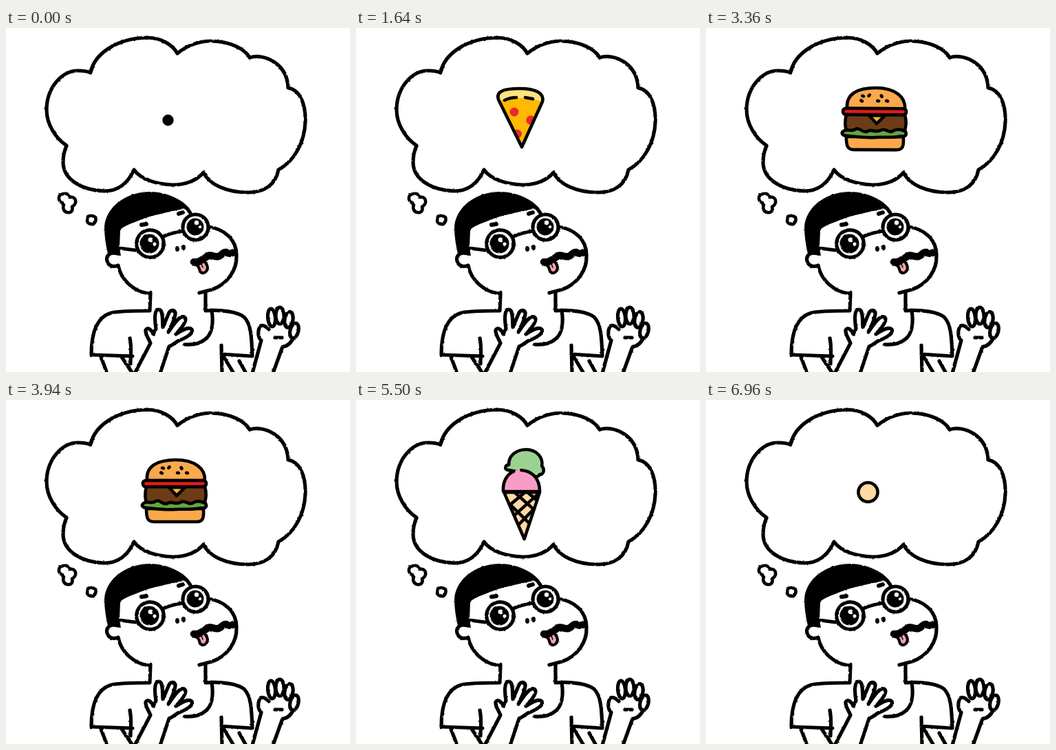
These frames come from a looping animation (500 by 500 pixels, 7 s). An HTML page:

```html
<!DOCTYPE html>
<html lang="en">
<head>
<meta charset="utf-8">
<title>Daydreaming of food</title>
<style>
  html, body { margin: 0; width: 100%; height: 100%; overflow: hidden; background: #fff; }
  svg { display: block; width: 100%; height: 100%; }
  .ink { fill: none; stroke: #000; stroke-width: 5.2; stroke-linecap: round; stroke-linejoin: round; }
  .ink .paper { fill: #fff; }
  .ink .solid { fill: #000; stroke: none; }
  .food { stroke-width: 4.6; }
  .food * { vector-effect: non-scaling-stroke; }
  .flat { stroke: none; }
</style>
</head>
<body>
<svg viewBox="0 0 500 500">
  <defs>
    <clipPath id="slice"><path d="M207 104C203 92 215 88 238 88C262 88 274 95 271 107L241 173Z"/></clipPath>
    <clipPath id="wafer"><path d="M215 134H267L245 202Z"/></clipPath>
    <filter id="marker" filterUnits="userSpaceOnUse" x="0" y="0" width="500" height="500" color-interpolation-filters="sRGB">
      <feTurbulence type="fractalNoise" baseFrequency=".2" numOctaves="2" seed="4"/>
      <feDisplacementMap in="SourceGraphic" scale="2.2" xChannelSelector="R" yChannelSelector="G"/>
    </filter>
  </defs>

  <g filter="url(#marker)">
    <!-- thought bubble -->
    <g class="ink">
      <path d="M123 65C128 38 160 15 205 14C225 14 242 24 249 37C262 26 280 19 297 19C325 19 347 30 354 43C375 36 409 52 410 87C428 90 436 112 435 137C434 165 420 193 396 206C392 228 375 239 352 239C320 239 295 227 287 210C278 221 262 228 242 228C218 227 196 220 186 206C178 224 165 237 143 237C110 236 83 220 83 195C83 186 85 178 88 171C72 160 59 140 59 119C59 88 80 62 105 62C112 62 118 63 123 65Z"/>
      <path stroke-width="4.6" d="M82 254C75 252 75 242 83 241C88 240 92 242 93 246C98 245 102 248 101 254C100 258 97 259 96 260C98 266 94 269 89 268C84 267 82 262 84 257C82 256 82 255 82 254Z"/>
      <path stroke-width="4.6" d="M119 274Q125 271 130 275Q132 281 127 285Q120 286 118 281Z"/>
    </g>

    <!-- body -->
    <g class="ink">
      <path d="M210 385L209 411C185 411 165 411 153 414C135 419 124 437 124 475L184 477M180 451C183 464 181 476 181 488M138 478L147 502M168 478L184 502"/>
      <path d="M290 384V409M290 411C315 409 337 413 346 420C356 430 357 448 358 477L313 474M313 461L314 502M316 477L331 502M339 484L349 502"/>
      <path d="M299 410C302 430 300 444 290 452C282 459 272 461 260 460"/>
      <path class="paper" d="M187 502L210 458C207 451 202 444 203 439C206 434 211 438 214 445L218 437C216 425 215 409 222 409C229 410 227 424 228 435L236 416C239 408 247 409 246 416C245 425 240 433 236 442C243 432 252 417 259 420C265 424 256 435 247 445C255 440 265 433 270 438C273 444 262 450 252 454C247 456 244 460 237 463L224 502"/>
      <path d="M358 502L371 454C365 449 366 438 370 433C374 431 378 434 382 438M418 450C413 460 408 463 402 463L388 502M391 450H401"/>
      <g class="paper">
        <ellipse rx="6" ry="11" transform="translate(419 440) rotate(14)"/>
        <ellipse rx="6" ry="11.500" transform="translate(411 424) rotate(10)"/>
        <ellipse rx="6" ry="12" transform="translate(398 418)"/>
        <ellipse rx="5.500" ry="13" transform="translate(386 421) rotate(-5)"/>
      </g>
    </g>

    <!-- head -->
    <g class="ink">
      <path class="paper" d="M163 328C150 324 145 332 147 339C149 346 157 348 163 345C167 366 186 384 209 386"/>
      <path class="solid" d="M148 328C145 316 143 302 143 290C144 262 172 239 208 238C236 238 260 251 269 266L258 263C238 267 212 272 195 279C180 285 168 289 166 294L165 320L167 331Z"/>
      <path d="M263 262L268 269M294 289C318 292 335 308 335 330C336 352 322 372 300 380L281 385"/>
      <path d="M165 320L188 323M229 303C236 299 246 297 257 295"/>
      <path stroke-width="6" d="M197 286L204 285M251 270L257 268"/>
      <circle class="paper" cx="209.500" cy="313.500" r="19.800"/>
      <circle class="paper" cx="275.500" cy="289.500" r="18.500"/>
      <g class="solid">
        <circle cx="208.500" cy="313.500" r="14"/><circle cx="275" cy="289" r="12.500"/>
        <ellipse cx="249" cy="321" rx="3" ry="4"/><ellipse cx="258" cy="319" rx="3" ry="4"/>
      </g>
      <g class="flat" fill="#fff">
        <circle cx="210" cy="308" r="3.500"/><circle cx="216" cy="314" r="2.500"/>
        <circle cx="277" cy="283" r="3.200"/><circle cx="282" cy="289" r="2.200"/>
      </g>
      <path fill="#f5a3ab" stroke-width="4" d="M274 344C280 344 281 350 282 354C287 359 293 354 293 348C292 343 290 340 286 338"/>
      <path stroke-width="1.500" d="M284 343L286 348"/>
      <path stroke-width="10.500" d="M273 340C280 342 286 336 291 333C297 327 303 334 309 332C315 330 315 325 320 326C324 329 327 328 331 326"/>
    </g>
  </g>

  <path id="blob" class="ink"/>

  <g class="ink food" id="pizza">
    <g clip-path="url(#slice)" class="flat">
      <path fill="#ffb900" d="M200 80H280V180H200Z"/>
      <path fill="#ffe47d" d="M200 80H280V110Q238 94 200 109Z"/>
      <g fill="#ea2a2d"><circle cx="230" cy="122" r="6.500"/><circle cx="254" cy="134" r="6.800"/><circle cx="234.500" cy="154" r="6.500"/></g>
    </g>
    <path d="M207 104C203 92 215 88 238 88C262 88 274 95 271 107L241 173ZM216 105Q224 101 233 101M246 101L257 103"/>
  </g>

  <g class="ink food" id="burger">
    <path fill="#fba94c" d="M205 117C203 96 220 87 247 87C275 87 290 100 289 117Z"/>
    <path fill="#fba94c" d="M204 158H287C288 172 286 177 277 177H215C206 177 204 172 204 158Z"/>
    <path fill="#6d3c17" d="M204 126H289C292 136 291 144 288 151H205C201 143 202 134 204 126Z"/>
    <path fill="#fdb92e" d="M237 127H260L248 139Z"/>
    <rect fill="#e4191e" x="199" y="117" width="92" height="9" rx="4"/>
    <path fill="#65a442" d="M200 150C206 146 210 151 216 148C222 143 227 152 233 151C240 145 246 153 253 149C260 144 265 153 271 150C278 145 285 148 290 150C293 156 289 158 283 157C270 160 258 158 246 159C232 160 218 158 206 157C198 157 196 153 200 150Z"/>
    <g id="seeds" class="flat" fill="#000"></g>
  </g>

  <g class="ink food" id="cone">
    <path fill="#9bd291" d="M221 102C215 102 216 95 222 94C221 81 233 72 247 72C262 72 272 83 270 96C275 101 272 109 267 108C264 113 258 112 256 108Z"/>
    <path class="flat" fill="#f79dc5" d="M214 133C213 112 225 101 240 101C256 101 267 114 267 133Z"/>
    <path d="M240 102C256 103 267 114 267 133H214C213 119 219 108 229 104"/>
    <path fill="#ffdaa3" d="M215 134H267L245 202Z"/>
    <path clip-path="url(#wafer)" d="M229 133L261 161M219 147L252 179M247 133L221 155M264 137L228 170M259 158L235 183M248 133L268 150"/>
  </g>
</svg>

<script>
const LOOP = 7000, GROW = 480, SHRINK = 580;
const $ = id => document.getElementById(id);
const blob = $('blob');

$('seeds').innerHTML = [[228, 99, 20], [237, 98, -50], [226, 106, 30], [250, 106, 10], [255, 99, 60], [263, 106, 20]]
  .map(([x, y, a]) => `<ellipse rx="3.2" ry="2.4" transform="translate(${x} ${y}) rotate(${a})"/>`).join('');

// moments when one idea turns into the next: time, place, tip sharpness, tilt
const turns = [
  { at: 0, x: 235.5, y: 134, tip: 0, tilt: 0 },
  { at: 2720, x: 237.5, y: 133.5, tip: 1, tilt: 52 },
  { at: 4840, x: 236, y: 140, tip: 1, tilt: 38 },
  { at: LOOP, x: 235.5, y: 134, tip: 0, tilt: 0 }
];
const foods = [
  { el: $('pizza'), x: 239, y: 131, rest: 1640, fill: '#ffb900' },
  { el: $('burger'), x: 246, y: 133, rest: 3940, fill: '#fba94c' },
  { el: $('cone'), x: 243, y: 137, rest: 6080, fill: '#ffdaa3' }
];

const clamp = v => Math.max(0, Math.min(1, v));
const mix = (a, b, k) => a + (b - a) * k;
const backOut = p => 1 + 2.2 * (p - 1) ** 3 + 1.2 * (p - 1) ** 2;

// a circle whose top can be drawn out into a point
function dropPath(r, tip) {
  const w = r * (1 - .25 * tip), top = -r * (1 + .75 * tip), k = .55;
  const c = k * w * (1 - tip * .8);
  return `M0 ${top}C${c} ${top} ${w} ${-r * k} ${w} 0S${w * k} ${r} 0 ${r}S${-w} ${r * k} ${-w} 0S${-c} ${top} 0 ${top}Z`;
}

function drawBlob(size, turn, fill) {
  const r = size * 75;
  const tip = turn.tip * clamp((19 - r) / 11.5);
  blob.setAttribute('d', dropPath(r - 2.2, tip));
  blob.setAttribute('transform', `translate(${turn.x} ${turn.y}) rotate(${turn.tilt})`);
  blob.style.fill = r < 9 ? '#000' : fill;
  blob.style.strokeWidth = 4.6 - 2 * tip;
}

function draw(t) {
  const i = t < turns[1].at ? 0 : t < turns[2].at ? 1 : 2;
  const food = foods[i], from = turns[i], to = turns[i + 1];
  const grow = backOut(clamp((t - from.at) / GROW));
  const shrink = clamp((t - to.at + SHRINK) / SHRINK) ** 2;
  const size = .1 + .9 * (grow - shrink);
  const turn = shrink > 0 ? to : from;
  const small = size < .25;

  blob.style.display = small ? '' : 'none';
  foods.forEach(f => f.el.style.display = f === food && !small ? '' : 'none');
  if (small) return drawBlob(size, turn, food.fill);

  const scale = mix(.4, 1, (size - .25) / .75);
  const near = (size - .1) / .9;
  const sway = 1.2 * Math.sin((t - food.rest) / 170);
  const angle = turn.tilt * .3 * (1 - near) + sway;
  food.el.setAttribute('transform',
    `translate(${mix(turn.x, food.x, near)} ${mix(turn.y, food.y, near)}) rotate(${angle}) scale(${scale}) translate(${-food.x} ${-food.y})`);
}

const start = performance.now();
function tick(now) {
  draw(Math.max(0, now - start) % LOOP);
  requestAnimationFrame(tick);
}
draw(0);
requestAnimationFrame(tick);
</script>
</body>
</html>
```
